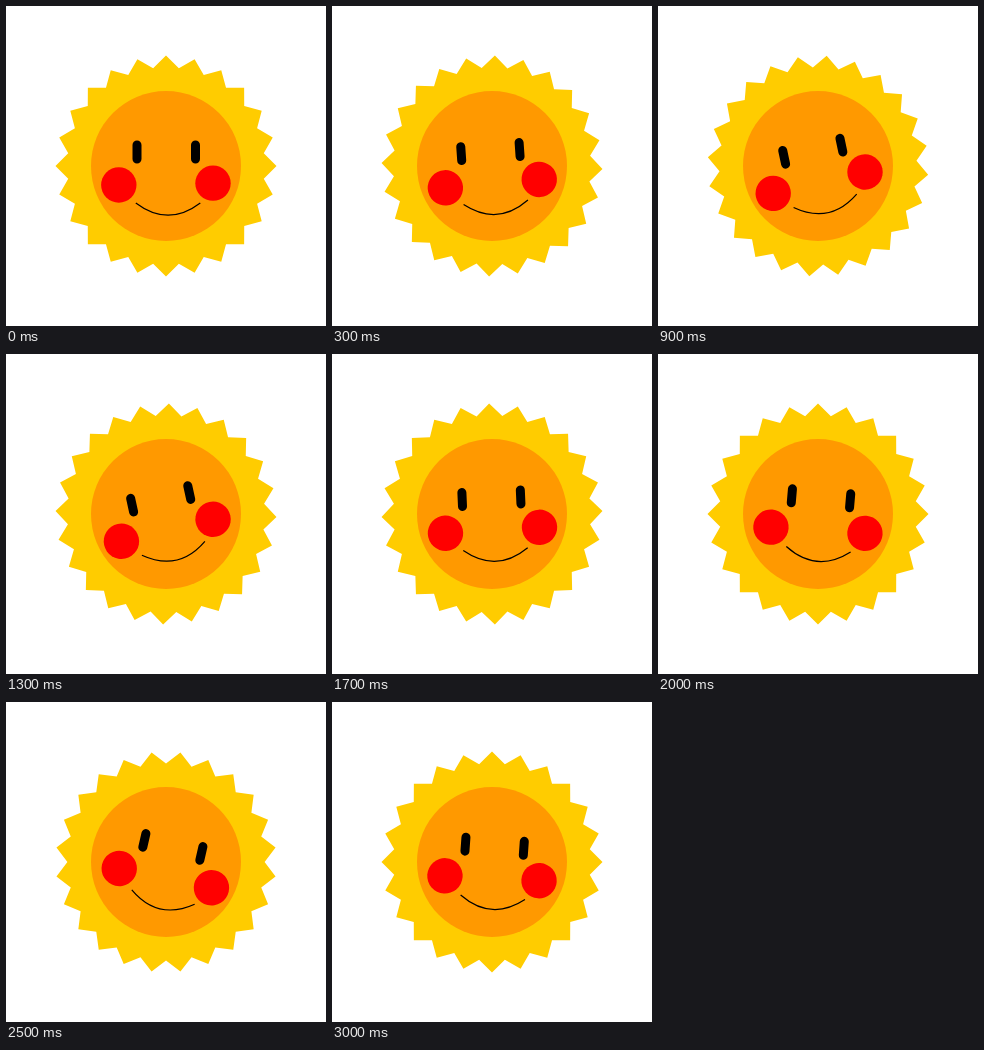
An HTML page for the animation above (3100 ms loop, 320 px wide and 320 px high).

```html
<!DOCTYPE html>
<html lang="en">
<head>
<meta charset="utf-8">
<title>Sun</title>
<style>
  html, body { margin: 0; width: 100%; height: 100%; overflow: hidden; background: #fff; }
  svg { display: block; width: 100vw; height: 100vh; }
</style>
</head>
<body>
<svg viewBox="0 0 320 320">
  <polygon id="rays" fill="#fc0"/>
  <circle cx="160" cy="160" r="75" fill="#f90"/>
  <g id="face">
    <path d="M-29.3-34.8v14M29.2-34.8v14" stroke="#000" stroke-width="9" stroke-linecap="round"/>
    <circle cx="-47.5" cy="5.2" r="17.7" fill="red"/>
    <circle cx="46.7" cy="3.4" r="17.7" fill="red"/>
    <path d="M-30.5 23.2Q1.8 47.6 34 23.2" fill="none" stroke="#000" stroke-width="1.2"/>
  </g>
</svg>
<script>
const STEP = 100, STEPS = 31, SPIKES = 24;
const TIP = 110.5, VALLEY = 98.6;
const SPIN = -4.5; // degrees per step

// [step, tilt in degrees, pivot x, pivot y]
const poses = [
  [0, 0, 160.3, 173.75],
  [11.7, -15.6, 160.7, 172],
  [24, 14.7, 160.7, 172],
  [31, 2.3, 160.7, 172]
];

const rays = document.getElementById('rays');
const face = document.getElementById('face');

rays.setAttribute('points', Array.from({ length: SPIKES * 2 }, (_, i) => {
  const angle = i * Math.PI / SPIKES;
  const radius = i % 2 ? VALLEY : TIP;
  return [radius * Math.sin(angle), -radius * Math.cos(angle)];
}).join(' '));

function poseAt(step) {
  const next = poses.findIndex(pose => pose[0] > step);
  const a = poses[next - 1], b = poses[next];
  const k = (step - a[0]) / (b[0] - a[0]);
  return a.map((v, i) => v + (b[i] - v) * k);
}

function place(node, x, y, angle) {
  node.setAttribute('transform', `translate(${x} ${y}) rotate(${angle})`);
}

function draw() {
  const step = Math.floor(performance.now() / STEP) % STEPS;
  const [, tilt, x, y] = poseAt(step);
  place(rays, 160, 160, step * SPIN);
  place(face, x, y, tilt);
  requestAnimationFrame(draw);
}
draw();
</script>
</body>
</html>
```
